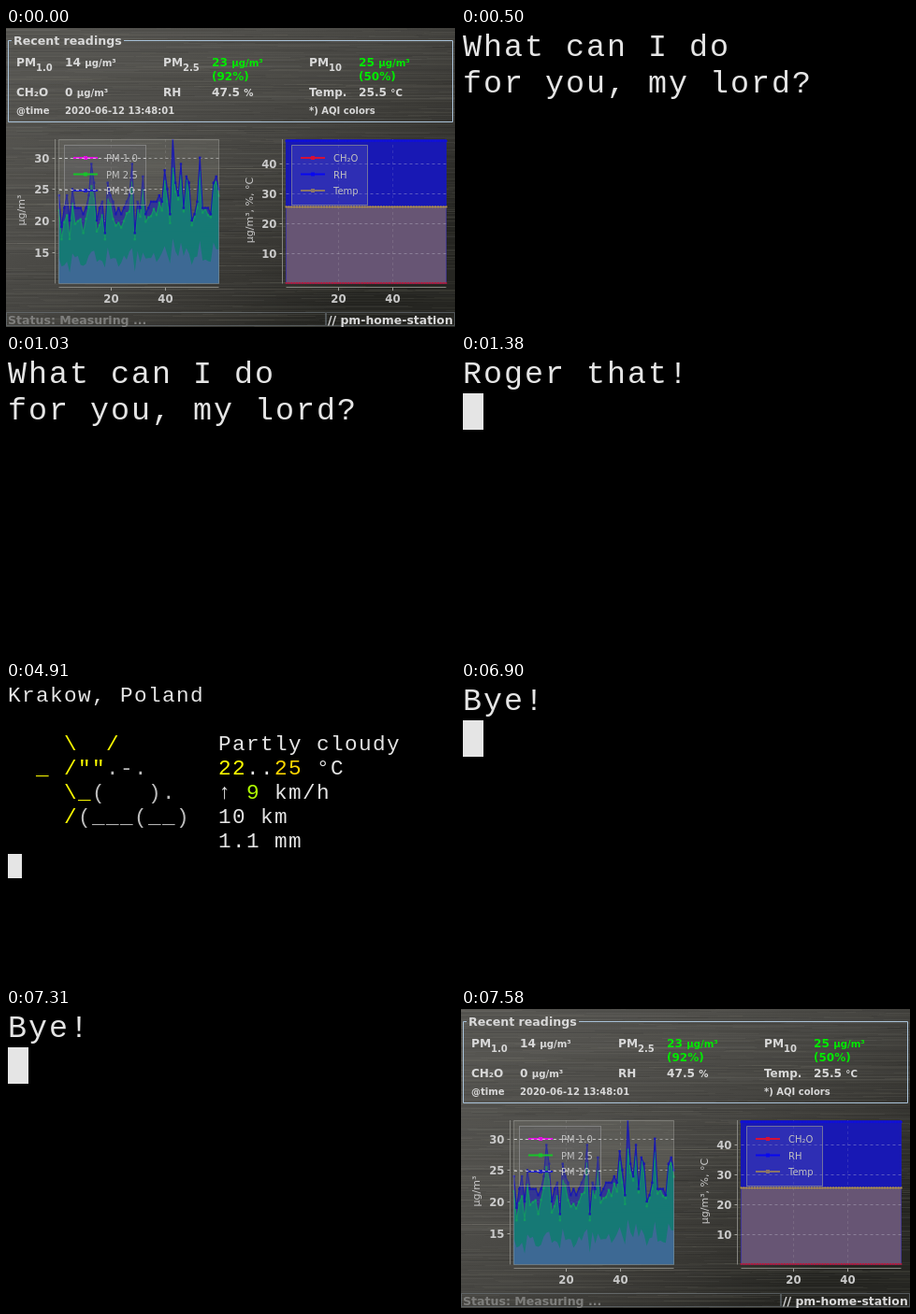
Recreate the animation shown at these times as an HTML page with a canvas. Size 480 by 320 pixels, loop 8 s.

```html
<!DOCTYPE html>
<html lang="en">
<head>
<meta charset="utf-8">
<title>Air quality station</title>
<style>
html, body { margin: 0; width: 100%; height: 100%; overflow: hidden; background: #000; }
canvas { display: block; width: 480px; height: 320px; }
</style>
</head>
<body>
<canvas id="stage" width="480" height="320"></canvas>
<script>
const W = 480, H = 320, LOOP = 8000;
const ctx = document.getElementById('stage').getContext('2d');
const SANS = '"DejaVu Sans", sans-serif';
const MONO = '"Liberation Mono", monospace';
const LIGHT = '#d8d8d8', GREEN = '#00ea00';

function rng(seed) {
  return () => {
    seed = (seed * 1664525 + 1013904223) >>> 0;
    return seed / 4294967296;
  };
}

function text(g, s, x, y, size, color = LIGHT, weight = 'bold', align = 'left') {
  g.font = `${weight} ${size}px ${SANS}`;
  g.textAlign = align;
  g.fillStyle = color;
  g.fillText(s, x, y);
}

function line(g, x1, y1, x2, y2, color, width = 1, dash = []) {
  g.strokeStyle = color;
  g.lineWidth = width;
  g.setLineDash(dash);
  g.beginPath();
  g.moveTo(x1, y1);
  g.lineTo(x2, y2);
  g.stroke();
  g.setLineDash([]);
}

function box(g, x, y, w, h, color) {
  g.strokeStyle = color;
  g.lineWidth = 1;
  g.strokeRect(x + .5, y + .5, w - 1, h - 1);
}

// ---- dashboard ----

function metal(g) {
  const base = g.createLinearGradient(90, 0, 330, H);
  [[0, '#565551'], [.3, '#4f4e4a'], [.55, '#454440'], [.8, '#363531'], [1, '#262622']]
    .forEach(([p, c]) => base.addColorStop(p, c));
  g.fillStyle = base;
  g.fillRect(0, 0, W, H);
  const rnd = rng(11);
  for (let i = 0; i < 1300; i++) {
    const len = 40 + rnd() * 200, x = rnd() * (W + 120) - 120, y = Math.floor(rnd() * H);
    const tone = rnd() < .5 ? '0,0,0' : '190,188,175';
    g.fillStyle = `rgba(${tone},${(.02 + rnd() * .05).toFixed(3)})`;
    g.fillRect(x, y, len, 1);
  }
}

function reading(g, x, y, value, unit, color = LIGHT) {
  text(g, value, x, y, 12.2, color);
  const w = g.measureText(value + ' ').width;
  text(g, unit, x + w, y, 10.2, color);
}

function readings(g) {
  g.strokeStyle = '#a9c2d8';
  g.lineWidth = 1;
  g.beginPath();
  g.moveTo(6, 13.5);
  g.lineTo(2.5, 13.5);
  g.lineTo(2.5, 100.5);
  g.lineTo(477.5, 100.5);
  g.lineTo(477.5, 13.5);
  g.lineTo(126, 13.5);
  g.stroke();
  text(g, 'Recent readings', 8, 18, 12.6);

  [[11, 32, '1.0'], [168, 189, '2.5'], [324, 345, '10']].forEach(([x, sx, sub]) => {
    text(g, 'PM', x, 41, 12.2);
    text(g, sub, sx, 46, 10);
  });
  reading(g, 63, 41, '14', 'μg/m³');
  reading(g, 220, 41, '23', 'μg/m³', GREEN);
  reading(g, 377, 41, '25', 'μg/m³', GREEN);
  text(g, '(92%)', 220, 56, 12, GREEN);
  text(g, '(50%)', 377, 56, 12, GREEN);
  text(g, 'CH₂O', 11, 73, 12);
  reading(g, 63, 73, '0', 'μg/m³');
  text(g, 'RH', 168, 73, 12);
  reading(g, 220, 73, '47.5', '%');
  text(g, 'Temp.', 324, 73, 12);
  reading(g, 377, 73, '25.5', '°C');
  text(g, '@time', 11, 92, 10);
  text(g, '2020-06-12 13:48:01', 63, 92, 10);
  text(g, '*) AQI colors', 324, 92, 10);
}

const TOP = 119, BOTTOM = 273.5, STEP = 2.9;

function tracePath(g, pts) {
  g.beginPath();
  pts.forEach(([x, y], i) => i ? g.lineTo(x, y) : g.moveTo(x, y));
}

function area(g, pts, fill) {
  tracePath(g, pts);
  g.lineTo(pts[pts.length - 1][0], BOTTOM);
  g.lineTo(pts[0][0], BOTTOM);
  g.fillStyle = fill;
  g.fill();
}

function curve(g, pts, color, width, dot) {
  tracePath(g, pts);
  g.strokeStyle = color;
  g.lineWidth = width;
  g.lineJoin = 'round';
  g.stroke();
  g.fillStyle = color;
  pts.forEach(([x, y]) => g.fillRect(x - dot / 2, y - dot / 2, dot, dot));
}

function axes(g, left, ticks, yOf, title, titleX) {
  const axisX = left - 4;
  line(g, axisX, TOP, axisX, BOTTOM, '#85857f');
  line(g, left, 277.5, left + 171, 277.5, '#85857f');
  ticks.forEach(v => {
    const y = Math.round(yOf(v)) + .5;
    line(g, axisX - 3, y, axisX, y, '#a0a09b');
    text(g, v, left - 10, y + 4, 11.7, '#cacaca', 'bold', 'right');
  });
  [20, 40].forEach(n => {
    const x = Math.round(left + (n - 1) * STEP) + .5;
    line(g, x, 278, x, 281, '#a0a09b');
    text(g, n, x, 294, 11.7, '#cacaca', 'bold', 'center');
  });
  g.save();
  g.translate(titleX, 195);
  g.rotate(-Math.PI / 2);
  text(g, title, 0, 0, 11, '#cacaca', 'normal', 'center');
  g.restore();
}

function grid(g, left, ticks, yOf, color) {
  ticks.forEach(v => {
    const y = Math.round(yOf(v)) + .5;
    line(g, left, y, left + 171, y, color, 1, [3, 3]);
  });
  [20, 40].forEach(n => {
    const x = Math.round(left + (n - 1) * STEP) + .5;
    line(g, x, TOP, x, BOTTOM, 'rgba(215,215,215,.14)', 1, [3, 3]);
  });
}

function legend(g, x, w, items, fill) {
  g.fillStyle = fill;
  g.fillRect(x, 125, w, 65);
  box(g, x, 125, w, 65, 'rgba(150,150,150,.65)');
  items.forEach(([name, color], i) => {
    const y = 139 + i * 17.5;
    line(g, x + 10, y, x + 36, y, color, 2);
    g.fillStyle = color;
    g.fillRect(x + 21, y - 2, 4, 4);
    text(g, name, x + 45, y + 4, 10, '#c0c0c0', 'normal');
  });
}

const pm10 = [
  24, 19, 22, 24, 20, 25, 22, 22, 22, 21, 22, 24, 29, 26, 20, 22, 23, 18, 26, 24,
  23, 21, 22, 21, 22, 23, 24, 29, 18, 23, 22, 27, 21, 22, 23, 23, 23, 24, 23, 28,
  25, 21, 33, 26, 24, 29, 22, 27, 26, 20, 21, 23, 30, 22, 22, 22, 21, 26, 27, 25
];

function particles(g) {
  const left = 56.5, ticks = [15, 20, 25, 30];
  const yOf = v => 206 - (v - 20) * 6.72;
  const points = vals => vals.map((v, i) => [left + i * STEP, yOf(v)]);
  const rnd = rng(5);
  // The finer fraction lags further behind early on and on tall peaks.
  const pm25 = pm10.map((v, i) =>
    Math.max(17, v - rnd() * 1.5 - 2 * (1 - i / 59) - Math.max(0, v - 27) * .6));
  const pm1 = pm25.map(v => 14 + (v - 21) * .4 + (rnd() - .5) * 1.8);

  g.fillStyle = 'rgba(135,135,128,.26)';
  g.fillRect(left, TOP, 171, BOTTOM - TOP);
  grid(g, left, ticks, yOf, 'rgba(225,225,225,.5)');
  g.save();
  g.beginPath();
  g.rect(left - 1, TOP, 173, BOTTOM - TOP);
  g.clip();
  area(g, points(pm10), 'rgba(45,48,158,.86)');
  area(g, points(pm25), 'rgba(20,126,116,.93)');
  area(g, points(pm1), 'rgba(66,104,152,.9)');
  curve(g, points(pm25), 'rgba(18,158,96,.85)', 1.2, 2.4);
  curve(g, points(pm10), '#1919b0', 1.2, 2.4);
  g.restore();
  box(g, 56, 119, 172, 155, 'rgba(175,175,170,.4)');
  legend(g, 62, 88, [['PM 1.0', '#e010e0'], ['PM 2.5', '#18c42a'], ['PM 10', '#1f1fc4']], 'rgba(95,95,100,.3)');
  [139.5, 173.5].forEach(y => line(g, 57, y, 150, y, 'rgba(225,225,225,.7)', 1, [3, 3]));
  axes(g, left, ticks, yOf, 'μg/m³', 20);
}

function climate(g) {
  const left = 299.5, ticks = [10, 20, 30, 40];
  const yOf = v => 273 - v * 3.2;
  const flat = v => pm10.map((_, i) => [left + i * STEP, yOf(v)]);
  g.fillStyle = '#1818b4';
  g.fillRect(299, TOP, 172, BOTTOM - TOP);
  area(g, flat(25.5), '#675574');
  grid(g, left, ticks, yOf, 'rgba(205,205,220,.36)');
  curve(g, flat(47.5), '#1010d8', 1.5, 2);
  curve(g, flat(25.5), '#b0924c', 1, 2);
  curve(g, flat(0), '#b81838', 1.2, 1.6);
  legend(g, 305, 82, [['CH₂O', '#d41038'], ['RH', '#0808f0'], ['Temp', '#8a7468']], 'rgba(90,90,180,.34)');
  axes(g, left, ticks, yOf, 'μg/m³, %, °C', 264);
}

function statusBar(g) {
  box(g, 0, 304, 342, 15, 'rgba(122,132,140,.5)');
  box(g, 342, 304, 138, 15, 'rgba(122,132,140,.5)');
  text(g, 'Status: Measuring ...', 2, 317, 12.55, '#7e7e7c');
  text(g, '// pm-home-station', 344, 317, 12.45, LIGHT);
}

function buildDashboard() {
  const c = document.createElement('canvas');
  c.width = W;
  c.height = H;
  const g = c.getContext('2d');
  [metal, readings, particles, climate, statusBar].forEach(draw => draw(g));
  return c;
}

// ---- terminal ----

const BIG = { size: 33.33, cw: 22, ch: 39, base: 30 };
const SMALL = { size: 22.67, cw: 15, ch: 26, base: 21 };
const INK = '#e5e5e5', SUN = '#ffff00', CLOUD = '#bcbcbc';

function put(f, col, row, str, color = INK) {
  ctx.font = `${f.size}px ${MONO}`;
  ctx.textAlign = 'left';
  ctx.fillStyle = color;
  [...str].forEach((c, i) => ctx.fillText(c, 2 + (col + i) * f.cw, f.base + row * f.ch));
}

function cursor(f, row) {
  ctx.fillStyle = INK;
  ctx.fillRect(2, 2 + row * f.ch, f.cw, f.ch);
}

function ask() {
  put(BIG, 0, 0, 'What can I do');
  put(BIG, 0, 1, 'for you, my lord?');
}

function say(str) {
  put(BIG, 0, 0, str);
  cursor(BIG, 1);
}

function weather() {
  const rows = [
    [0, 0, 'Krakow, Poland'],
    [4, 2, '\\  /', SUN], [15, 2, 'Partly cloudy'],
    [2, 3, '_ /""', SUN], [7, 3, '.-.', CLOUD],
    [15, 3, '22', SUN], [17, 3, '..'], [19, 3, '25', '#ffd700'], [22, 3, '°C'],
    [4, 4, '\\_', SUN], [6, 4, '(   ).', CLOUD],
    [15, 4, '↑'], [17, 4, '9', '#afff00'], [19, 4, 'km/h'],
    [4, 5, '/', SUN], [5, 5, '(___(__)', CLOUD], [15, 5, '10 km'],
    [15, 6, '1.1 mm']
  ];
  rows.forEach(r => put(SMALL, ...r));
  cursor(SMALL, 7);
}

// ---- timeline ----

const dashboard = buildDashboard();
const showDashboard = () => ctx.drawImage(dashboard, 0, 0);
const scenes = [
  [500, showDashboard],
  [1380, ask],
  [1920, () => say('Roger that!')],
  [6900, weather],
  [7580, () => say('Bye!')],
  [LOOP, showDashboard]
];

const start = performance.now();
function frame() {
  const t = (performance.now() - start) % LOOP;
  ctx.fillStyle = '#000';
  ctx.fillRect(0, 0, W, H);
  scenes.find(([end]) => t < end)[1]();
  requestAnimationFrame(frame);
}
frame();
</script>
</body>
</html>
```
